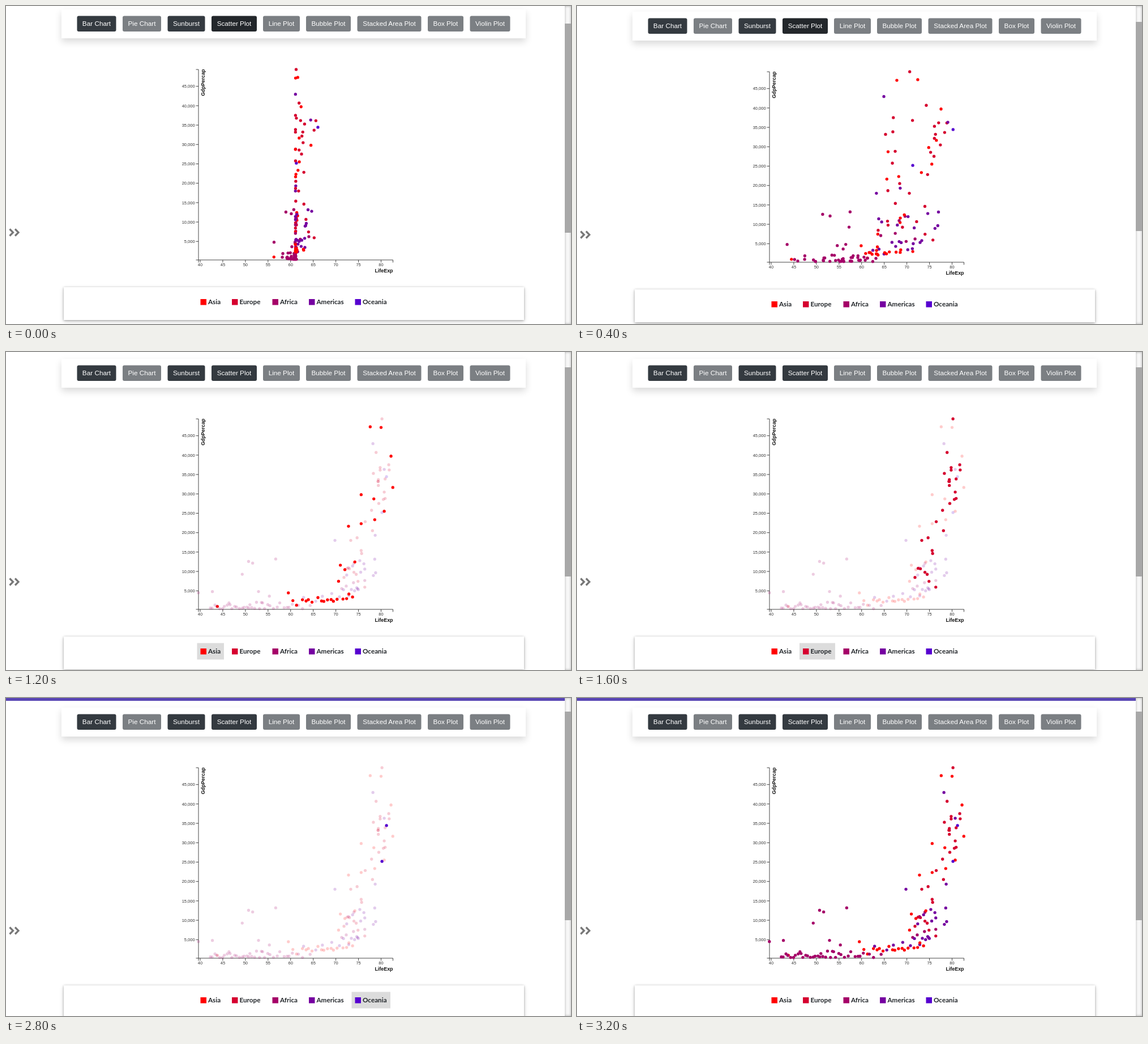
Animation of 998x561 px, one loop 3600 ms. Source, as an HTML page:

```html
<!DOCTYPE html>
<html lang="en">
<head>
<meta charset="utf-8">
<style>
  html, body { margin: 0; width: 100%; height: 100%; overflow: hidden; background: #fff; }
  #page, svg, .card, #bar, #track, #thumb { position: absolute; }
  #page { left: 0; top: 0; width: 998px; height: 561px; }
  svg { left: 0; top: 0; overflow: visible; }
  .card { background: #fff; }
  #nav { left: 98px; top: 12px; width: 820px; height: 51px; box-shadow: 0 6px 12px rgba(0,0,0,.15); }
  #legend { left: 101.5px; top: 502px; width: 813px; height: 57.5px; box-shadow: 0 1px 4px rgba(0,0,0,.35), 0 4px 10px rgba(0,0,0,.1); }
  #bar { left: 0; top: -50px; width: 987px; height: 49.5px; background: #5946b4; }
  #track { left: 986.5px; top: 0; width: 11.5px; height: 561px; background: #f8f8f8; box-shadow: inset 0 0 4px rgba(0,0,0,.3); }
  #thumb { left: 986.5px; width: 11.5px; height: 368.5px; background: #a8a8a8; }
  text { font-family: "Liberation Sans", Arial, sans-serif; }
  .button { font-size: 11.75px; fill: #fff; text-anchor: middle; }
  .tick { font-size: 7.5px; fill: #333; }
  .title { font-size: 8.9px; font-weight: bold; fill: #111; text-anchor: end; }
  .key { font: bold 11.7px Lato, sans-serif; fill: #212529; }
</style>
</head>
<body>
<div id="page">
  <div id="bar"></div>
  <div id="nav" class="card"></div>
  <div id="legend" class="card"></div>
  <svg id="svg" width="998" height="561"></svg>
</div>
<div id="track"></div>
<div id="thumb"></div>
<script>
const $ = id => document.getElementById(id);

function add(tag, attrs, text) {
  const el = document.createElementNS("http://www.w3.org/2000/svg", tag);
  for (const k in attrs) el.setAttribute(k, attrs[k]);
  if (text) el.textContent = text;
  $("svg").append(el);
  return el;
}

// Buttons: label, left edge, width, enabled
const buttons = [
  ["Bar Chart", 125.5, 69, 1], ["Pie Chart", 206, 68, 0], ["Sunburst", 285.5, 66, 1],
  ["Scatter Plot", 363, 80, 1], ["Line Plot", 454, 65, 0], ["Bubble Plot", 530, 79, 0],
  ["Stacked Area Plot", 620.5, 113, 0], ["Box Plot", 745, 63, 0], ["Violin Plot", 819.5, 71, 0]
].map(([label, x, width, on]) => {
  const box = add("rect", { x, y: 23.5, width, height: 27.5, rx: 3, fill: on ? "#343a40" : "#7b7f83" });
  add("text", { x: x + width / 2, y: 41, class: "button" }, label);
  return box;
});

add("path", { d: "M6.5 399.5l6 6l-6 6m9.5-12l6 6l-6 6", fill: "none", stroke: "#777", "stroke-width": 3.2 });

// Axes
const px = life => 343 + (life - 40) * 7.9875;
const py = gdp => 455.5 - gdp * 6.84;
let axes = "M335.5 118H340V454H335.5M340 458.5V454H683.5V458.5";
for (let v = 40; v <= 80; v += 5) {
  axes += `M${px(v)} 454v4.5`;
  add("text", { x: px(v), y: 465.4, class: "tick", "text-anchor": "middle" }, v);
}
for (let v = 5; v <= 45; v += 5) {
  axes += `M335.5 ${py(v)}h4.5`;
  add("text", { x: 333.6, y: py(v) + 2.6, class: "tick", "text-anchor": "end" }, v + ",000");
}
add("path", { d: axes, fill: "none", stroke: "#333", "stroke-width": .9 });
add("text", { x: 683.5, y: 475.6, class: "title" }, "LifeExp");
add("text", { transform: "translate(351 117.5) rotate(-90)", class: "title" }, "GdpPercap");

// Legend: continent key, label, swatch left, label right, colour
const groups = [
  ["A", "Asia", 343.5, 379, "#ff0000"], ["E", "Europe", 399, 450, "#d6002f"],
  ["F", "Africa", 470.5, 514.5, "#a50068"], ["M", "Americas", 535, 596.5, "#7500a0"],
  ["O", "Oceania", 616.5, 673, "#5600d0"]
].map(([key, label, x, end, color]) => {
  const shade = add("rect", { x: x - 6, y: 513.5, width: end - x + 12, height: 29, fill: "#dcdcdc" });
  add("rect", { x, y: 523, width: 10.5, height: 10.5, fill: color });
  add("text", { x: x + 13.5, y: 532.2, class: "key" }, label);
  return { key, color, shade };
});

// Continent of each country in order; capitals have a listed value,
// small letters belong to the dense low-income band.
const order = "AEFFMOEAaE fmEFMEffaf MffMamffFM fEMEEfmmFm FffEEFfEfE mffmmAEEaa AAEAEmAafa AAAffFffAf " +
  "fFMaEffaFa EOmffEAaMm maEEMFEffA fEfAEEfFEa fFEEaAfAfM FEfEMMMaaa ff";

// Life expectancy, GDP per head in thousands
const values = [
  43.8, .98, 76.4, 5.94, 72.3, 6.22, 42.7, 4.8, 75.3, 12.78, 81.2, 34.44, 79.8, 36.13, 75.6, 29.8, 79.4, 33.69,
  74.9, 7.45, 50.7, 12.57, 72.4, 9.07, 73, 10.68, 80.7, 36.32, 78.6, 13.17, 55.3, 3.63, 78.8, 9.65,
  75.7, 14.62, 78.3, 8.95, 76.5, 22.83, 78.3, 35.28, 71.3, 5.58, 51.6, 12.15, 79.3, 33.21, 80.7, 30.47,
  56.7, 13.21, 79.4, 32.17, 79.5, 27.54, 82.2, 39.73, 73.3, 18.01, 81.8, 36.18, 71, 11.61, 59.5, 4.47,
  78.9, 40.68, 80.7, 25.52, 80.5, 28.57, 82.6, 31.66, 78.6, 23.35, 77.6, 47.31, 72, 10.46, 74, 12.06,
  74.2, 12.45, 72.8, 10.96, 76.2, 11.98, 74.5, 9.25, 52.9, 4.81, 79.8, 36.8, 80.2, 25.19, 80.2, 49.36,
  75.6, 22.32, 75.5, 9.81, 75.6, 15.39, 78.1, 20.51, 78.7, 19.33, 76.4, 7.67, 72.5, 10.81, 72.8, 21.66,
  74, 9.79, 80, 47.14, 74.7, 18.68, 77.9, 25.77, 49.3, 9.27, 80.9, 28.82, 39.6, 4.51, 80.9, 33.86,
  81.7, 37.51, 74.1 + 4.3, 28.72, 70.6, 7.46, 69.8, 18.01, 73.9, 7.09, 71.8, 8.46, 79.4, 33.2, 78.2, 42.95,
  76.4, 10.61, 73.7, 11.42
];

// Band shapes: u spreads evenly over the band, r is random
const bands = {
  f: (u, r) => [42 + 18.5 * u + 5 * u ** 8, .4 + 1.7 * r * r],
  a: (u, r) => [60 + 14.5 * u, .8 + 2.3 * u + 1.6 * r],
  m: (u, r) => [75 - 14 * u ** 2.5, 7.3 - 3.3 * u - 2.2 * r]
};
const frac = v => v - Math.floor(v);
const used = { f: 0, a: 0, m: 0 };
let next = 0;
const dots = [...order.replace(/ /g, "")].map((c, i) => {
  const [life, gdp] = bands[c]
    ? bands[c](frac(++used[c] * .618034), frac(Math.sin(i * 12.9898) * 43758.5453))
    : [values[next++], values[next++]];
  const group = groups.find(g => g.key === c.toUpperCase());
  return { group, x: px(life), el: add("circle", { cy: py(gdp), r: 2.65, fill: group.color }) };
});

const cubic = u => u < .5 ? 4 * u ** 3 : 1 - 4 * (1 - u) ** 3;
const clamp = u => Math.min(1, Math.max(0, u));

// Per 400 ms step: page shift, transition clock in ms, hovered continent
const steps = [
  [-6, 410], [-1.6, 785], [0, 2000], [0, 2000, "A"], [0, 2000, "E"],
  [5, 2000, "F"], [5, 2000, "M"], [5, 2000, "O"], [5, 2000]
];
let shown = -1;

function draw(now) {
  requestAnimationFrame(draw);
  const step = Math.floor(now % 3600 / 400);
  if (step === shown) return;
  shown = step;
  const [shift, clock, hover] = steps[step];
  $("page").style.top = shift + "px";
  $("thumb").style.top = 27 - shift * .7 + "px";
  buttons[3].setAttribute("fill", step < 2 ? "#23272b" : "#343a40");
  for (const g of groups) g.shade.setAttribute("opacity", g.key === hover ? 1 : 0);
  dots.forEach(({ el, x, group }, i) => {
    const p = cubic(clamp((clock - 3 * i) / 1000));
    el.setAttribute("cx", 511.3 + (x - 511.3) * p);
    el.setAttribute("opacity", !hover || group.key === hover ? 1 : .2);
  });
}
draw(performance.now());
</script>
</body>
</html>
```
